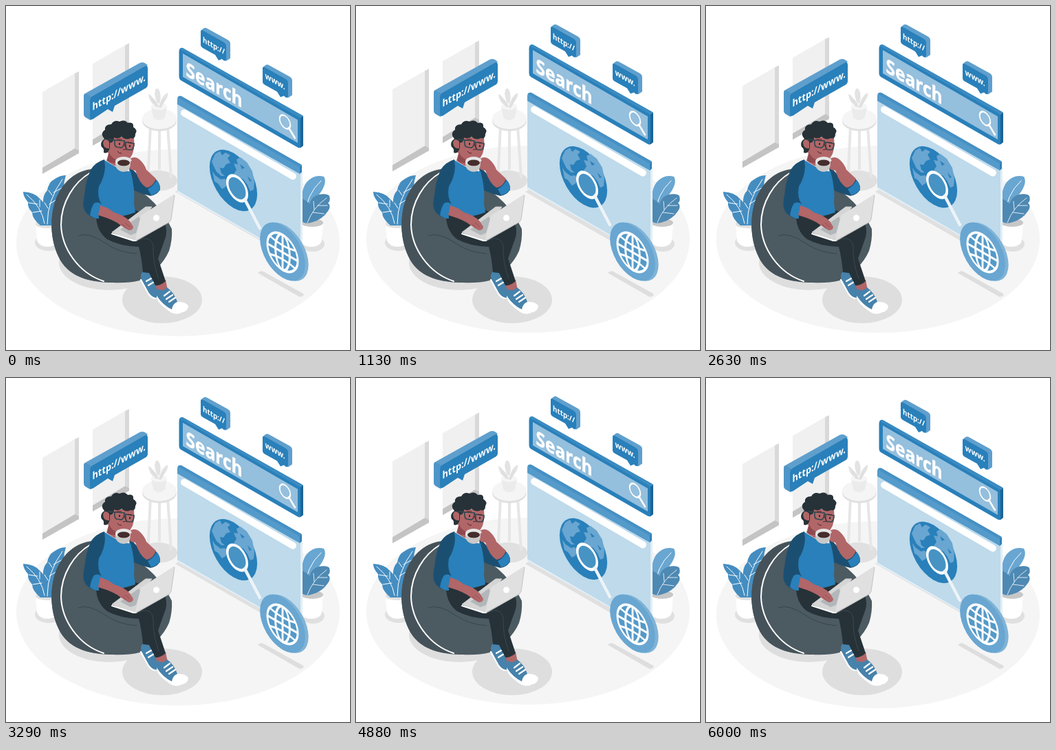
These frames come from a looping animation (500 by 500 pixels, 6040 ms). An HTML page:

```html
<!DOCTYPE html>
<html lang="en">
<head>
<meta charset="utf-8">
<title>Web search</title>
<style>
html, body { margin: 0; width: 100%; height: 100%; overflow: hidden; background: #fff; }
svg { display: block; width: 100vw; height: 100vh; }
text { font-family: "Open Sans", "Noto Sans", sans-serif; font-weight: 700; fill: #fff; }
.line { fill: none; stroke: #fff; stroke-linecap: round; stroke-linejoin: round; }
.round { stroke-linejoin: round; }
</style>
</head>
<body>
<svg viewBox="0 0 500 500">
<defs>
  <g id="panel">
    <path fill="#f0f0f0" d="M53 125L100 98V207L53 235Z"/>
    <path fill="#d9d9d9" d="M100 98L106 95V214L100 207Z"/>
    <path fill="#c4c4c4" d="M53 235L100 207L106 210V214L53 244Z"/>
  </g>
  <g id="bubble">
    <path fill="#5f9fcd" d="M283 37Q283 35 288 32Q290 31 293 33L322 49Q326 51 326 55V76L320 80Z"/>
    <path fill="#2980ba" d="M283 37Q283 34 287 36L317 53Q320 55 320 59V77Q320 81 316 79L314 77L309 79L304 71L286 61Q283 59 283 57Z"/>
  </g>
</defs>

<ellipse class="fast" cx="250" cy="344" rx="235" ry="136" fill="#f5f5f5"/>
<g class="slow">
  <use href="#panel"/>
  <use href="#panel" x="73" y="-41"/>
</g>

<!-- side table -->
<ellipse cx="221" cy="254" rx="28" ry="15" fill="#e0e0e0"/>
<path d="M210 174L206 258M223 174V238M235 174L240 250" stroke="#e6e6e6" stroke-width="4"/>
<ellipse cx="223" cy="167" rx="25" ry="15" fill="#e0e0e0"/>
<ellipse cx="223" cy="164" rx="25" ry="15" fill="#f5f5f5"/>
<path fill="#e3e3e3" d="M220 148Q214 130 207 128Q207 139 220 148M222 146Q214 130 217 122Q221 116 224 126Q226 136 222 146M223 147Q225 131 235 126Q237 134 223 147"/>
<path fill="#ebebeb" d="M211 146L214 162Q222 170 231 162L234 146Z"/>
<ellipse cx="222.500" cy="146" rx="11.500" ry="5" fill="#f5f5f5"/>
<path fill="#e0e0e0" d="M217 146Q211 136 210 132Q218 135 222 147Q224 138 231 133Q231 140 225 148Z"/>

<!-- ground shadows -->
<path fill="#e0e0e0" d="M246 270L254 265L440 372L432 377Z"/>
<path fill="#dedede" d="M366 388Q370 384 374 386L432 418Q435 421 427 423Z"/>

<!-- right plant -->
<ellipse cx="446" cy="346" rx="17" ry="11" fill="#e0e0e0"/>
<path fill="#fff" d="M428 316V340Q430 350 444 350Q458 349 459 340L461 316Z"/>
<ellipse cx="445" cy="315" rx="16" ry="6" fill="#c7c7c7"/>
<path fill="#69a6d1" d="M430 310Q426 270 437 256Q448 244 462 248Q467 256 458 270Q446 284 442 313Z"/>
<path class="line" stroke-width="1" d="M434 308Q436 274 458 254"/>
<path fill="#4e89b3" d="M430 280Q438 283 441 288Q445 276 455 274Q466 272 470 276Q472 284 468 286Q473 291 468 298Q460 310 446 314Q436 318 430 313Z"/>
<path class="line" stroke-width=".8" d="M438 315Q446 293 466 279M448 296L447 284M453 290L467 290M446 300L462 302"/>

<!-- browser window -->
<g class="fast">
  <path fill="#e3eef6" d="M249 146L431 240V374L249 271Z"/>
  <path fill="#bedaeb" d="M249 143L428 244V371L249 268Z"/>
  <path fill="#549aca" d="M249 136Q249 130 254 131L428 230Q430 231 430 234V241L427 244L249 143Z"/>
  <path fill="#4690c4" d="M250 133Q251 130 255 131L430 231L427 234Z"/>
  <path fill="#2f82ba" d="M427 234L430 231V241L427 244Z"/>
  <path class="line" stroke-width="10" d="M259 155.500L417 247.500"/>
  <g>
    <circle r="40" fill="#2980ba" transform="matrix(.866 .5 0 1 330.500 253.500)"/>
    <path fill="#69a6d1" d="M299 226L304 215L311 211L314 217L319 213L326 217L322 221L326 228L320 230L316 236L311 235L313 243L318 247L313 247L306 241L302 233ZM300 240L304 246L312 252L318 251L323 256L319 263L314 266L308 258L303 255ZM331 229L337 230L335 223L341 220L350 227L358 240L361 256L360 267L355 269L351 260L345 252L338 249L331 244L335 238Z"/>
    <path fill="#2980ba" d="M340 230L347 235L343 237ZM351 247L357 254L354 255Z"/>
  </g>
  <g class="line">
    <circle r="16.500" fill="#bedaeb" fill-opacity=".2" stroke-width="4" transform="matrix(.866 .5 0 1 336 265)"/>
    <path stroke="#edf3f7" stroke-width="4.500" d="M347 281L369 323"/>
  </g>
</g>

<!-- search bar -->
<g class="fast">
  <path fill="#2980ba" d="M251.500 66Q252 60 257 61L429 158Q432 159 432 162V203L428 206Q426 207 423 205L254 108Q251.500 106 251.500 103Z"/>
  <path fill="#3b8bc1" d="M253 63Q255 60 258 62L432 160L428 163Z"/>
  <path fill="#1d6496" d="M428 163L432 160V203L428 206Z"/>
  <path fill="#94bfdd" d="M257 69L424 165.500V199L257 103Z"/>
  <text font-size="28.300" stroke="#fff" stroke-width=".6" transform="matrix(.866 .5 0 1 261.500 101)">Search</text>
  <circle class="line" r="9" stroke-width="2.200" transform="matrix(.866 .5 0 1 405.500 168.500)"/>
  <path class="line" stroke-width="2.500" d="M411 177L420 192"/>
</g>

<!-- address bubbles -->
<g class="fast">
  <use href="#bubble"/>
  <text font-size="11.300" transform="matrix(.866 .5 0 1 286 52.500)">http://</text>
  <use href="#bubble" x="90" y="53.500"/>
  <text font-size="12" transform="matrix(.866 .5 0 1 376.500 105)">www.</text>
</g>
<g class="fast">
  <path fill="#5f9fcd" d="M113 132Q113 128 117 126L194 83Q198 81 202 83L206 86L123 166L116 162Q113 160 113 157Z"/>
  <path fill="#4f95c7" d="M113 131Q113 128 115 127L124 132Q122 135 122 139V163L123 166L116 162Q113 160 113 157Z"/>
  <path fill="#2980ba" d="M122 138Q122 133 126 131L201 88Q206 85 206 91V114Q206 118 202 120L158 145L155 154L148 150L127 164Q122 167 122 161Z"/>
  <text font-size="14.700" transform="matrix(.866 -.49 0 1 125.500 152)">http://www.</text>
</g>

<!-- globe coin -->
<g transform="matrix(.866 .5 0 1 402 357)">
  <circle r="38" cx="5.500" cy="-2.500" fill="#7fb3d6"/>
  <circle r="38" fill="#69a6d1"/>
  <g class="line" stroke-width="3.300" transform="translate(0 1)">
    <circle r="25.500" fill="#5499c8"/>
    <ellipse rx="12" ry="25.500"/>
    <path d="M0-25V25M-25 0H25M-21-13Q0-7 21-13M-21 13Q0 7 21 13"/>
  </g>
</g>

<!-- left plant -->
<ellipse cx="62" cy="344" rx="20" ry="12" fill="#e0e0e0"/>
<path fill="#fff" d="M43 317L45 341Q49 350 61 350Q73 349 76 341L78 317Z"/>
<ellipse cx="60" cy="317" rx="17" ry="6" fill="#e0e0e0"/>
<g fill="#458dc0">
  <path d="M50 319Q38 309 38 300Q31 293 32 285Q25 277 25 270Q42 271 49 280Q58 287 58 300L62 319Z"/>
  <path d="M58 319Q53 302 54 287Q53 275 60 268Q62 256 70 252Q78 246 87 246Q84 255 84 264Q79 270 78 279Q70 287 70 296L66 319Z"/>
</g>
<path class="line" stroke-width="1" d="M56 316Q52 292 30 274M52 298L39 300M46 288L33 286M49 292V282M60 317Q60 282 82 252M61 294L56 286M63 288L77 279M67 275L62 268M69 271L82 264"/>

<!-- bean bag -->
<ellipse cx="150" cy="373" rx="73" ry="40" fill="#dedede"/>
<ellipse cx="227" cy="427" rx="58" ry="34" fill="#dedede"/>
<path fill="#4c5a61" d="M127 237C103 238 81 255 71 285C62 315 66 350 82 374C97 395 125 402 155 402Q178 403 194 399Q225 383 237 356Q242 340 241 324Q220 280 180 260Z"/>
<path fill="#455259" d="M125 239C100 255 80 285 80 318C81 352 105 388 144 401C118 400 96 393 82 374C66 350 62 315 71 285C81 256 103 239 125 239Z"/>
<path class="line" stroke-width="2" d="M123 242C99 256 80 285 80 318C81 352 105 388 142 400"/>
<path fill="none" stroke="#37474f" d="M105 334Q120 328 145 345Q163 358 190 360"/>

<!-- legs and shoes -->
<path fill="#4682ab" d="M199 386Q194 390 197 398L207 417Q214 427 222 426L219 402L211 384Z"/>
<path class="line" stroke-width="2.200" d="M196 398L207 418Q212 425 218 425M204 400L211 396M207 406L215 401"/>
<path fill="#b16668" d="M217 402L232 398L235 413L220 416Z"/>
<path fill="#4682ab" d="M220 411Q228 416 234 409Q245 417 249 430L264 437L256 446L240 445Q228 436 219 423Z"/>
<path fill="#fff" d="M219 421Q228 435 241 441Q242 433 249 430Q261 429 265 436Q265 444 252 447Q242 449 235 442Q222 433 219 425Z"/>
<path class="line" stroke-width="2.200" d="M230 421L238 415M233 426L242 420M237 430L246 424"/>
<path fill="#263238" d="M131 304L188 297L225 309Q236 318 232 336L221 367L232 400Q224 407 217 406L208 388L199 387Q197 365 193 350Q165 349 147 339Q131 327 131 304Z"/>
<path fill="none" stroke="#3b484e" d="M188 342Q211 331 214 350M214 350Q213 372 222 397"/>

<!-- raised arm -->
<path fill="#1b4f72" d="M179 234Q190 240 201 261L217 251Q225 259 224 267Q219 275 210 276Q196 273 182 266Z"/>
<path fill="#2980ba" d="M206 266Q213 263 219 253Q224 258 224 266Q219 274 211 275Z"/>

<!-- body -->
<path fill="#2980ba" d="M143 224L158 233Q174 242 181 240Q188 265 186 287L188 300Q160 310 144 304Q130 300 131 260Z"/>
<path fill="#1b4f72" d="M143 223Q130 227 123 238Q116 254 114 275Q110 292 116 300Q122 307 132 309L139 288Q132 278 135 262Q143 250 144 234Z"/>
<path fill="#2980ba" d="M128 287Q134 283 141 290Q133 297 135 309Q127 309 122 304Q124 292 128 287Z"/>

<!-- head -->
<path fill="#b16668" d="M150 190L186 191Q188 211 181 220Q176 229 166 230Q164 235 157 232L146 225L149 214Q141 209 142 200Z"/>
<path fill="#8f4a50" d="M150 213Q154 223 165 225Q159 230 150 227L147 224Z"/>
<path fill="#263238" d="M151 206Q148 216 142 213Q143 207 139 205Q136 198 143 193Q136 185 144 180Q143 172 153 172Q157 165 165 168Q172 164 177 170Q186 168 185 176Q192 180 188 186Q188 194 181 192Q175 196 168 190Q162 194 157 191Q157 198 151 199Z"/>
<path fill="#b16668" d="M150 197Q143 190 141 199Q142 208 150 207Z"/>
<path fill="none" stroke="#37474f" stroke-width="1.700" d="M148 194L158 195M158 195Q157 204 161 205L168 206Q172 204 172 196ZM174 198Q173 208 177 209L183 209Q186 206 186 200ZM172 199L174 200"/>
<path fill="none" stroke="#4a2529" d="M161 194L168 194M177 198L183 199M172 201L175 208L170 209M162 211Q164 215 168 214"/>
<path fill="#263238" d="M164 199h2v3h-2M179 202h2v3h-2"/>

<!-- cup and hand -->
<path fill="#b16668" d="M180 222Q188 217 195 224Q202 231 204 238L218 251Q214 263 204 264Q194 258 188 239Q178 239 178 230Z"/>
<path fill="#c9c9c9" d="M159 226Q158 237 166 240Q174 243 179 237L183 226Z"/>
<ellipse cx="171" cy="226" rx="12" ry="7" fill="#e6e6e6"/>
<ellipse cx="171" cy="228" rx="9" ry="4.500" fill="#452d2d"/>
<path fill="#b16668" d="M181 226Q185 222 190 227L186 235Q179 236 181 226Z"/>

<!-- laptop -->
<path class="round" fill="#d5d5d5" stroke="#d5d5d5" d="M154 329L203 292L212 292L198 311L188 341L184 341Z"/>
<path fill="#b2b7ba" d="M166 325L193 306L195 310L189 330L181 333Z"/>
<path class="line" stroke="#b5b5b5" stroke-width="2" d="M154 331L185 341L189 341"/>
<path fill="#b16668" d="M137 290Q147 292 157 300Q172 304 180 313L185 321Q185 326 178 326L167 319Q158 311 134 304Z"/>
<path fill="none" stroke="#8f4a50" stroke-width=".8" d="M173 315L180 321M169 317L175 323"/>
<path class="round" fill="#e0e0e0" stroke="#e0e0e0" stroke-width="2" d="M197 305L244 275L239 309Q238 313 234 315L189 340Z"/>
<path fill="none" stroke="#c2c2c2" d="M245 275L240 310Q239 314 234 316L190 341"/>
<circle cx="218.500" cy="308" r="4.500" fill="#fff"/>
</svg>
<script>
const LOOP = 6040;
const start = performance.now();
const groups = [['.fast', 1500], ['.slow', 6000]].map(
  ([name, period]) => [document.querySelectorAll(name), period]);

// Linear rise of 10 px and return
const lift = (t, period) => 10 * (Math.abs(1 - 2 * (t % period) / period) - 1);

function draw(now) {
  const t = Math.min(Math.max(0, now - start) % LOOP, 6000);
  for (const [nodes, period] of groups) {
    const y = lift(t, period);
    nodes.forEach(n => n.setAttribute('transform', `translate(0 ${y})`));
  }
  requestAnimationFrame(draw);
}
draw(start);
</script>
</body>
</html>
```
